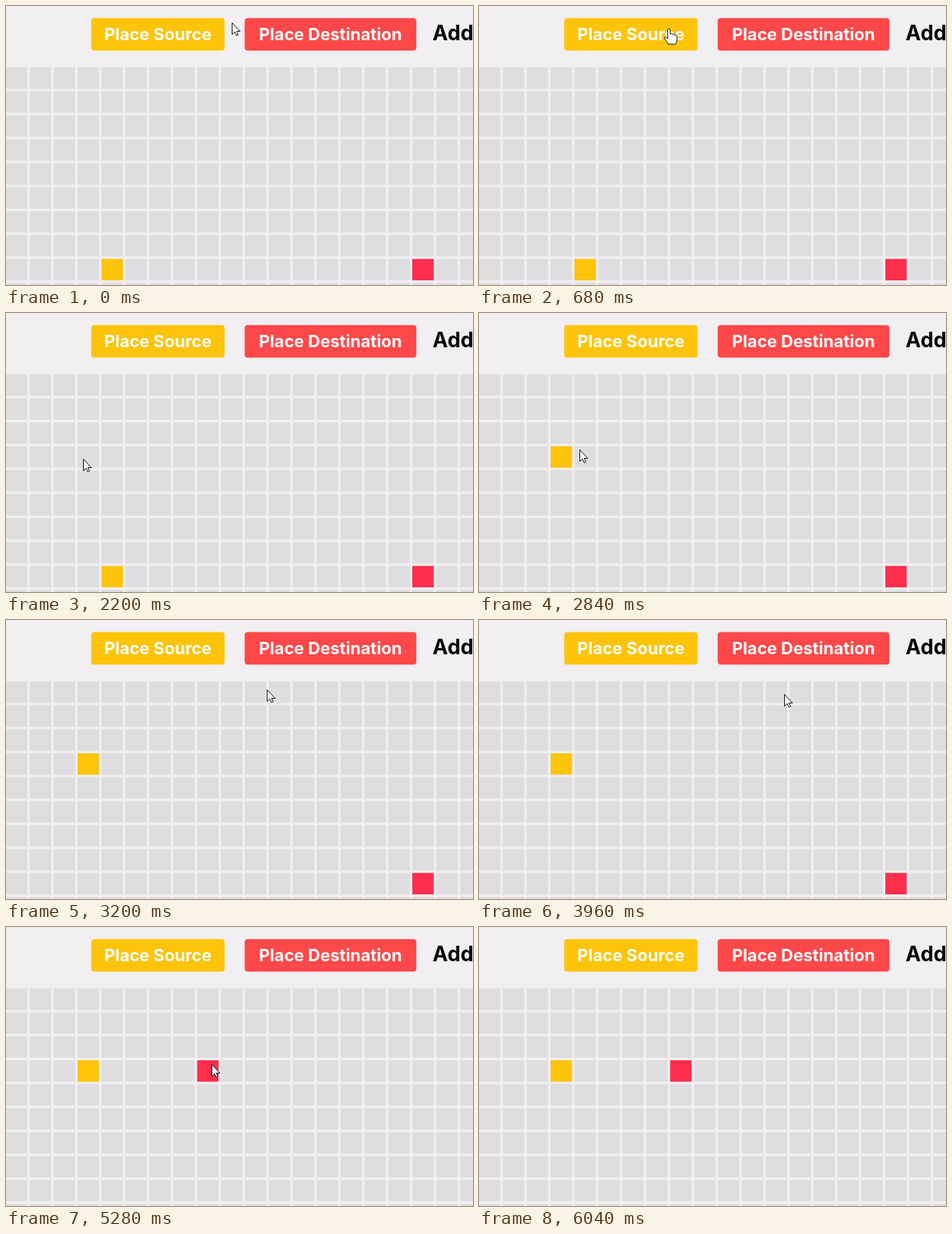
An HTML page with a canvas that plays this animation: 600 by 358 pixels, repeating every 6.64 s.

```html
<!DOCTYPE html>
<html lang="en">
<head>
<meta charset="utf-8">
<title>Place source and destination</title>
<style>
  html, body { margin: 0; width: 100%; height: 100%; overflow: hidden; background: #f1eff2; }
  canvas { display: block; }
</style>
</head>
<body>
<canvas id="stage" width="600" height="358"></canvas>
<script>
const ctx = document.getElementById('stage').getContext('2d');
const LOOP = 6640, STEP = 40;
const PITCH = 30.72, CELL = 27.5, LEFT = -0.2, TOP = 78.8;
const YELLOW = '#fdc40a', RED = '#ff484a', PINK = '#ff2e4c';
const SOURCE_PLACED = 2360, DESTINATION_PLACED = 4920, POINTER_GONE = 6040;

const buttons = [
  { label: 'Place Source', x: 109.5, w: 171.3, color: YELLOW },
  { label: 'Place Destination', x: 306.6, w: 220.6, color: RED }
];
const BUTTON_TOP = 15.4, BUTTON_HEIGHT = 41.8;

const easeIn = u => u ** 1.75;
const easeOut = u => 1 - easeIn(1 - u);
const easeInOut = u => u * u * (3 - 2 * u);

// Each move starts where the previous one ended
const home = { x: 290, y: 21 };
const moves = [
  { at: 0, x: 244, y: 29, ease: easeInOut },
  { at: 1080, x: 122, y: 190, ease: easeOut },
  { at: 1760, x: 99, y: 187, ease: easeOut, time: 440 },
  { at: 2680, x: 477, y: 31, ease: easeIn },
  { at: 3640, x: 291, y: 172, ease: easeInOut },
  { at: 4320, x: 264, y: 176, ease: easeOut, time: 360 },
  { at: 5520, x: 602, y: -10, ease: easeIn, time: 520 }
];

function pointerAt(t) {
  let { x, y } = home;
  for (const move of moves) {
    const u = Math.min(1, Math.max(0, (t - move.at) / (move.time || 680)));
    const k = move.ease(u);
    x += (move.x - x) * k;
    y += (move.y - y) * k;
  }
  return { x: Math.round(x), y: Math.round(y) };
}

const arrow = new Path2D('M.5 .5V15.5L4 12.3L6.2 17L8.3 16L6.2 11.5H10.8Z');
const hand = new Path2D('M-1.7 1.5Q0 -1.5 1.7 1.5V7Q3.6 5.4 4.8 7.4Q6.7 6.2 7.7 8.2' +
  'Q10.2 7.4 10.4 10V14Q10.4 17 8.6 20H-.8Q-2 17 -5.5 13Q-6.5 10.6 -4.4 10.7L-1.7 13Z');

function drawCell(col, row, color) {
  ctx.fillStyle = color;
  ctx.fillRect(LEFT + col * PITCH, TOP + row * PITCH, CELL, CELL);
}

function drawText(text, x, size, color, align) {
  ctx.font = `700 ${size}px Inter, sans-serif`;
  ctx.fillStyle = color;
  ctx.textAlign = align;
  ctx.fillText(text, x, 44);
}

function drawButton({ label, x, w, color }) {
  ctx.fillStyle = color;
  ctx.beginPath();
  ctx.roundRect(x, BUTTON_TOP, w, BUTTON_HEIGHT, 4);
  ctx.fill();
  drawText(label, x + w / 2, 21.6, '#fff', 'center');
}

function drawPointer({ x, y }) {
  const over = y >= BUTTON_TOP && y <= BUTTON_TOP + BUTTON_HEIGHT
    && buttons.some(b => x >= b.x && x <= b.x + b.w);
  const shape = over ? hand : arrow;
  ctx.save();
  ctx.translate(x, y);
  ctx.fillStyle = '#fff';
  ctx.strokeStyle = '#18181a';
  ctx.fill(shape);
  ctx.stroke(shape);
  ctx.restore();
}

function draw(t) {
  ctx.fillStyle = '#f1eff2';
  ctx.fillRect(0, 0, 600, 358);
  for (let row = 0; row < 10; row++) {
    for (let col = 0; col < 20; col++) drawCell(col, row, '#dfdde0');
  }
  drawCell(...(t < SOURCE_PLACED ? [4, 8] : [3, 3]), YELLOW);
  drawCell(...(t < DESTINATION_PLACED ? [17, 8] : [8, 3]), PINK);
  buttons.forEach(drawButton);
  drawText('Add', 548, 26.5, '#050505', 'left');
  if (t < POINTER_GONE) drawPointer(pointerAt(t));
}

const start = performance.now();
function frame() {
  const t = (performance.now() - start) % LOOP;
  draw(Math.floor(t / STEP) * STEP);
  requestAnimationFrame(frame);
}
frame();
</script>
</body>
</html>
```
